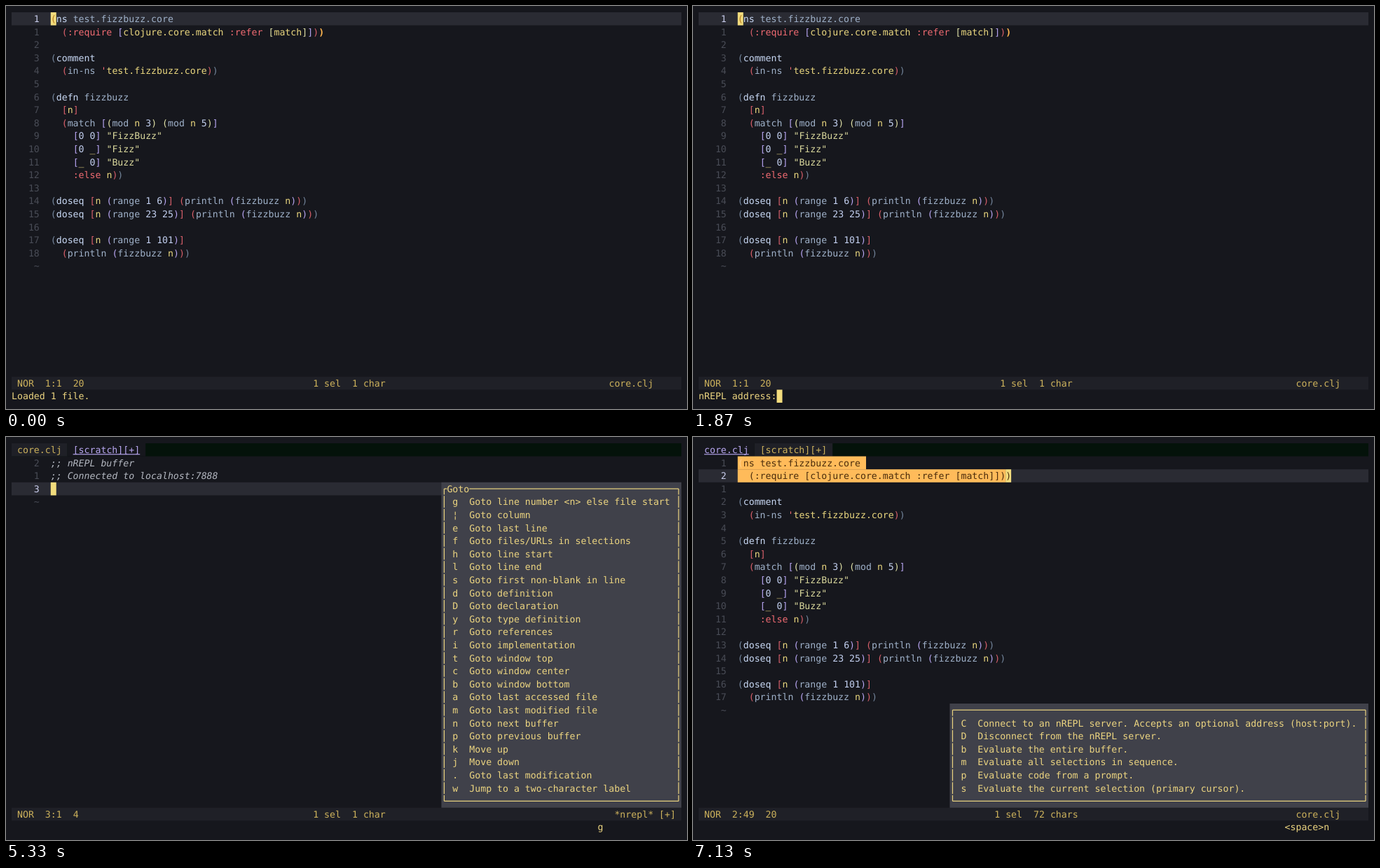
Recreate the animation shown at these times as an HTML page. Size 972 by 576 pixels, loop 8000 ms.

```html
<!DOCTYPE html>
<html lang="en">
<head>
<meta charset="utf-8">
<title>Editor session</title>
<style>
  html, body { margin: 0; width: 100%; height: 100%; overflow: hidden; background: #16171d; }
  svg { display: block; width: 972px; height: 576px; }
  text {
    font-family: "DejaVu Sans Mono", "Noto Sans Mono", monospace;
    font-size: 13.234px;
    white-space: pre;
    text-rendering: geometricPrecision;
  }
</style>
</head>
<body>
<svg id="stage" viewBox="0 0 972 576"></svg>
<script>
const LOOP = 8000, COLS = 120, CELL = 956 / COLS, ROW = 18.6;
const C = {
  bg: '#16171d', line: '#2a2b33', bar: '#1f2027', tabs: '#04120a',
  popup: '#40414a', text: '#ecd580', status: '#cdb25c', cursor: '#f2dc7d',
  select: '#ffbb5a', dark: '#4a2c0c', match: '#ffb64f',
  number: '#494c56', current: '#c9cdec', comment: '#b3b7c0',
  special: '#c8d8f4', func: '#9fb1c9', symbol: '#ead77f', keyword: '#f06b72',
  string: '#d9d79c', digit: '#c3d0f0', active: '#b9a8f2',
  parens: ['#75879d', '#d9606b', '#b8a6f2', '#dfe0a6']
};

const CODE = `(ns test.fizzbuzz.core
  (:require [clojure.core.match :refer [match]]))

(comment
  (in-ns 'test.fizzbuzz.core))

(defn fizzbuzz
  [n]
  (match [(mod n 3) (mod n 5)]
    [0 0] "FizzBuzz"
    [0 _] "Fizz"
    [_ 0] "Buzz"
    :else n))

(doseq [n (range 1 6)] (println (fizzbuzz n)))
(doseq [n (range 23 25)] (println (fizzbuzz n)))

(doseq [n (range 1 101)]
  (println (fizzbuzz n)))`.split('\n');

const menu = (title, list) => ({
  title,
  items: list.trim().split('\n').map(s => {
    const gap = s.indexOf(' ');
    return [s.slice(0, gap), s.slice(gap + 1)];
  })
});

const SPACE = menu('Space', `
f Open file picker
F Open file picker at current working directory
e Open file explorer in workspace root
E Open file explorer at current buffer's directory
b Open buffer picker
j Open jumplist picker
s Open symbol picker from LSP or syntax information
S Open workspace symbol picker from LSP or syntax information
d Open diagnostic picker
D Open workspace diagnostic picker
g Open changed file picker
a Perform code action
' Open last picker
G Debug (experimental)
w Window
y Yank selections to clipboard
Y Yank main selection to clipboard
p Paste clipboard after selections
P Paste clipboard before selections
R Replace selections by clipboard content
/ Global search in workspace folder
k Show docs for item under cursor
r Rename symbol
h Select symbol references
c Comment/uncomment selections
C Block comment/uncomment selections
A-c Line comment/uncomment selections
? Open command palette`);

const GOTO = menu('Goto', `
g Goto line number <n> else file start
¦ Goto column
e Goto last line
f Goto files/URLs in selections
h Goto line start
l Goto line end
s Goto first non-blank in line
d Goto definition
D Goto declaration
y Goto type definition
r Goto references
i Goto implementation
t Goto window top
c Goto window center
b Goto window bottom
a Goto last accessed file
m Goto last modified file
n Goto next buffer
p Goto previous buffer
k Move up
j Move down
. Goto last modification
w Jump to a two-character label`);

const MATCH = menu('Match', `
m Goto matching bracket
s Surround add
r Surround replace
d Surround delete
a Select around object
i Select inside object`);

const REPL = menu('', `
C Connect to an nREPL server. Accepts an optional address (host:port).
D Disconnect from the nREPL server.
b Evaluate the entire buffer.
m Evaluate all selections in sequence.
p Evaluate code from a prompt.
s Evaluate the current selection (primary cursor).`);

const px = col => 8 + col * CELL;
const py = row => 9 + row * ROW;
const esc = s => s.replace(/&/g, '&amp;').replace(/</g, '&lt;');
const box = (x, y, w, h, fill) =>
  `<rect x="${x.toFixed(2)}" y="${y.toFixed(2)}" width="${w.toFixed(2)}" height="${h.toFixed(2)}" fill="${fill}"/>`;
const cells = (col, row, w, h, fill) => box(px(col), py(row), w * CELL, h * ROW, fill);
const text = (col, row, str, fill, attrs = '') =>
  `<text x="${px(col).toFixed(2)}" y="${(py(row) + 14).toFixed(2)}" fill="${fill}" ${attrs}>${esc(str)}</text>`;

// Split the code into coloured tokens, with brackets coloured by depth.
function tokenize() {
  let depth = 0, prev = '';
  return CODE.map(line =>
    [...line.matchAll(/"[^"]*"|[()[\]']|[^\s()[\]']+/g)].map(({ 0: str, index: col }) => {
      let fill = C.symbol;
      if (/[([]/.test(str)) fill = C.parens[depth++];
      else if (/^[)\]]/.test(str)) fill = C.parens[--depth];
      else if (/^[:']/.test(str)) fill = C.keyword;
      else if (str[0] === '"') fill = C.string;
      else if (/^\d/.test(str)) fill = C.digit;
      else if (prev === '(') fill = /^(ns|comment|defn|doseq)$/.test(str) ? C.special : C.func;
      else if (/^(ns|defn)$/.test(prev)) fill = C.func;
      prev = str;
      return { str, col, fill };
    }));
}
const TOKENS = tokenize();

function gutter(top, count, current) {
  let out = cells(0, top + current, COLS, 1, C.line);
  for (let i = 0; i < count; i++) {
    const n = String(i === current ? i + 1 : Math.abs(i - current));
    out += text(5 - n.length, top + i, n, i === current ? C.current : C.number);
  }
  return out + text(4, top + count, '~', C.number);
}

function tabBar(active) {
  let col = 0, out = cells(0, 0, COLS, 1, C.tabs);
  ['core.clj', '[scratch][+]'].forEach((name, i) => {
    const on = i === active, w = name.length + 2;
    out += cells(col, 0, w, 1, on ? C.bg : C.bar) + text(col + 1, 0, name, on ? C.active : C.status);
    if (on) out += box(px(col + 1), py(0) + 15.2, name.length * CELL, 1.1, C.active);
    col += w;
  });
  return out;
}

function statusBar(mode, pos, lines, sel, chars, file, fileCol) {
  const start = chars.length > 6 ? 53 : 54;
  return cells(0, 28, COLS, 1, C.bar) +
    [[1, mode], [6, pos], [8 + pos.length, lines], [start, sel], [start + 7, chars], [fileCol, file]]
      .map(([col, str]) => text(col, 28, str, C.status)).join('');
}

function codeView({ tabs, selected, mode = 'NOR' }) {
  const top = tabs ? 1 : 0;
  let out = (tabs ? tabBar(0) : '') + gutter(top, CODE.length, selected ? 1 : 0);
  if (selected) {
    out += cells(7, top, 23, 1, C.select) + cells(7, top + 1, 48, 1, C.select) +
      cells(55, top + 1, 1, 1, C.cursor);
  } else {
    out += cells(7, top, 1, 1, C.cursor);
  }
  TOKENS.forEach((tokens, row) => tokens.forEach(({ str, col, fill }) => {
    const first = row === 0 && col === 0, last = row === 1 && col === 48;
    let color = fill, attrs = '';
    if (selected && row < 2) color = first ? '#ffd08a' : C.dark;
    else if (first) color = '#b5791f';
    else if (last) { color = C.match; attrs = 'font-weight="bold"'; }
    out += text(7 + col, top + row, str, color, attrs);
  }));
  return out + (selected
    ? statusBar(mode, '2:49', '20', '1 sel', '72 chars', 'core.clj', 107)
    : statusBar(mode, '1:1', '20', '1 sel', '1 char', 'core.clj', 107));
}

function replView() {
  const italic = 'font-style="italic"';
  return tabBar(1) + gutter(1, 3, 2) +
    text(7, 1, ';; nREPL buffer', C.comment, italic) +
    text(7, 2, ';; Connected to localhost:7888', C.comment, italic) +
    cells(7, 3, 1, 1, C.cursor) +
    statusBar('NOR', '3:1', '4', '1 sel', '1 char', '*nrepl* [+]', 108);
}

function popup({ title, items }, keys) {
  const longest = i => Math.max(...items.map(item => item[i].length));
  const full = items.length > 26, keyWidth = longest(0);
  const left = full ? 0 : COLS - 6 - keyWidth - longest(1);
  const bottom = full ? 29 : 27, top = bottom - items.length - 1;
  const x1 = px(left + .5), x2 = px(COLS - .5), mid = 9.2, stroke = 1.2;
  const side = (y, h) => [x1, x2].map(x => box(x - stroke / 2, y, stroke, h, C.text)).join('');
  const rule = (from, to, row) => box(from, py(row) + mid - stroke / 2, to - from, stroke, C.text);

  let out = cells(left, top, COLS - left, bottom - top + 1, C.popup);
  out += rule(x1, title ? px(left + 1) : x2, top);
  if (title) out += text(left + 1, top, title, C.text) + rule(px(left + 1 + title.length), x2, top);
  out += side(py(top) + mid, 8.4) + side(py(bottom) + .8, mid - .8);
  items.forEach(([key, label], i) => {
    const row = top + 1 + i;
    out += side(py(row) + .8, 16.8) + text(left + 2, row, key, C.text) +
      text(left + 4 + keyWidth, row, label, C.text);
  });
  if (full) out += rule(x1, px(105), bottom) + rule(px(105 + keys.length), x2, bottom);
  else out += rule(x1, x2, bottom);
  return out + text(105, 29, keys, C.text);
}

function prompt(typed) {
  const str = 'nREPL address:' + typed;
  return text(0, 29, str, C.text) + cells(str.length, 29, 1, 1, C.cursor);
}

const plain = () => codeView({});
const tabbed = options => codeView({ tabs: true, ...options });
const ADDRESS = 'localhost:7888';
const keyTimes = [2080, 2240, 2340, 2530];
for (let t = 2730; t <= 4530; t += 200) keyTimes.push(t);

const SCENES = [
  [0, () => plain() + text(0, 29, 'Loaded 1 file.', C.text)],
  [670, () => popup(SPACE, '<space>')],
  [870, () => plain() + popup(REPL, '<space>n')],
  [1870, () => plain() + prompt('')],
  ...keyTimes.map((t, i) => [t, () => plain() + prompt(ADDRESS.slice(0, i + 1))]),
  [4730, replView],
  [5330, () => replView() + popup(GOTO, 'g')],
  [5530, () => tabbed()],
  [5930, () => tabbed({ mode: 'SEL' })],
  [6130, () => tabbed({ mode: 'SEL' }) + popup(MATCH, 'm')],
  [6330, () => tabbed({ mode: 'SEL', selected: true })],
  [6530, () => tabbed({ selected: true })],
  [6930, () => popup(SPACE, '<space>')],
  [7130, () => tabbed({ selected: true }) + popup(REPL, '<space>n')]
];

const stage = document.getElementById('stage');
const start = performance.now();
let shown = -1;

function draw(now) {
  const t = Math.max(0, now - start) % LOOP;
  let index = 0;
  while (index + 1 < SCENES.length && SCENES[index + 1][0] <= t) index++;
  if (index !== shown) {
    shown = index;
    stage.innerHTML = box(0, 0, 972, 576, C.bg) + SCENES[index][1]();
  }
}

function tick(now) {
  draw(now);
  requestAnimationFrame(tick);
}
draw(start);
requestAnimationFrame(tick);
</script>
</body>
</html>
```
